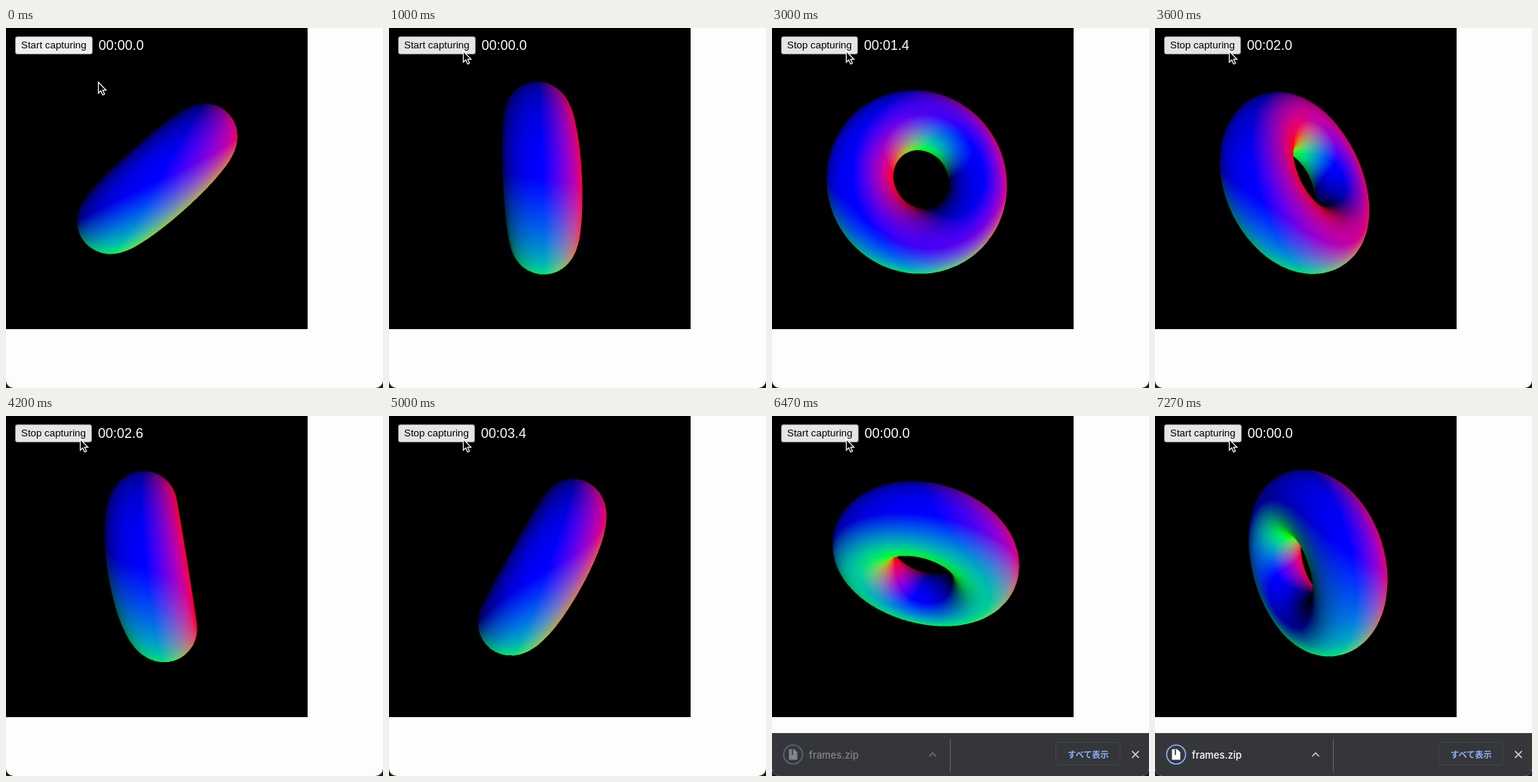
An HTML page with a canvas for the animation above (7.34 s loop, 500 px wide and 477 px high).

```html
<!DOCTYPE html>
<html lang="ja">
<head>
<meta charset="utf-8">
<title>Torus capture</title>
<style>
  html, body { margin: 0; width: 100%; height: 100%; overflow: hidden; background: #1c1c1c; }
  #window {
    position: absolute; left: 0; top: 0; width: 500px; height: 477px; overflow: hidden;
    border-radius: 0 0 10px 10px; background: #fdfdfd;
    font-family: "Liberation Sans", Arial, sans-serif;
  }
  #sketch { position: absolute; left: 0; top: 0; width: 400px; height: 399px; background: #000; }
  #torus { position: absolute; left: 68px; top: 67px; width: 264px; height: 264px; }
  #panel { position: absolute; left: 12px; top: 11px; height: 24px; display: flex; align-items: center; gap: 8px; white-space: nowrap; }
  #button {
    box-sizing: border-box; height: 24px; padding: 0 7px; line-height: 22px;
    border: 1px solid #8a8a8a; border-radius: 3px;
    background: #efefef; color: #000; font-size: 13.333px;
  }
  #button.hover { background: #e5e5e5; }
  #button.active { background: #f5f5f5; }
  #timer { color: #fff; font-size: 18px; line-height: 24px; }
  #overlay { position: absolute; left: 0; top: 0; }
  #bar { position: absolute; left: 0; top: 420px; width: 500px; height: 57px; background: #35363a; color: #fff; box-shadow: inset 0 1px #505155; }
  #bar svg { position: absolute; left: 0; top: 0; }
  #name { position: absolute; left: 49px; top: 20px; font: 500 13px/18px Inter, sans-serif; }
  #all { position: absolute; left: 392px; top: 19px; font: 700 11.2px/18px "Noto Sans CJK JP", "Noto Sans CJK", sans-serif; color: #8ab4f8; white-space: nowrap; }
</style>
</head>
<body>
<div id="window">
  <div id="sketch"></div>
  <canvas id="torus" width="528" height="528"></canvas>
  <div id="panel"><div id="button">Start capturing</div><div id="timer">00:00.0</div></div>
  <div id="bar">
    <svg width="500" height="57" fill="none">
      <g id="item">
        <circle id="halo" cx="28" cy="28.5" r="15" stroke="#8ab4f8" stroke-width="2"/>
        <circle cx="28" cy="28.5" r="12.5" fill="#35363a" stroke="#8ab4f8" stroke-width="1.6"/>
        <path d="M22.5 21.5H29.5L33.5 25.5V35.5H22.5Z" fill="#fff"/>
        <path d="M27 22V29" stroke="#35363a" stroke-width="1.6"/>
        <path d="M208.5 31L213 26.5L217.5 31" stroke="#c4c6ca" stroke-width="1.7"/>
      </g>
      <path d="M236.5 8V51" stroke="#66686d"/>
      <rect x="376.5" y="12.5" width="85" height="30" rx="3" stroke="#424449"/>
      <path d="M477.5 24L486.5 33M486.5 24L477.5 33" stroke="#d0d2d6" stroke-width="1.7"/>
    </svg>
    <div id="name">frames.zip</div>
    <div id="all">すべて表示</div>
  </div>
  <svg id="overlay" width="500" height="477" fill="none">
    <g id="ring">
      <circle cx="98.5" cy="31" r="19" stroke="#000" stroke-width="4.5"/>
      <circle cx="98.5" cy="31" r="21.2" stroke="#fff" stroke-width="1.4"/>
      <circle cx="98.5" cy="31" r="17.3" stroke="#fff" stroke-width="1.6"/>
    </g>
    <path id="pointer" d="M.5.8V15.3L3.8 12.2L6.2 17.8L8.7 16.7L6.3 11.3H10.7Z" fill="#000" stroke="#fff" stroke-width="1.2"/>
  </svg>
</div>
<script>
const LOOP = 7340, STEP = 1000 / 15, LAST = 109;
const CAPTURE = { origin: 1515, start: 1660, stop: 5850 };
const PRESSES = [[1390, 1590], [5590, 5810]];
const $ = id => document.getElementById(id);
const progress = (t, from, to) => Math.min(1, Math.max(0, (t - from) / (to - from)));
const ease = p => p * p * (3 - 2 * p);

// Torus mesh: ring radius 80, tube radius 40, seen from EYE
const RING = 80, TUBE = 40, AROUND = 72, ACROSS = 36;
const EYE = 200 / Math.tan(Math.PI / 6);
const canvas = $('torus'), ctx = canvas.getContext('2d');
const N = canvas.width, SCALE = 2;
const image = ctx.createImageData(N, N);
const pixels = new Uint32Array(image.data.buffer);
const depth = new Float32Array(N * N);
const mesh = [], faces = [];
for (let i = 0; i <= ACROSS; i++) {
  const phi = 2 * Math.PI * i / ACROSS;
  for (let j = 0; j <= AROUND; j++) {
    const theta = 2 * Math.PI * j / AROUND;
    const normal = [Math.cos(phi) * Math.cos(theta), Math.cos(phi) * Math.sin(theta), Math.sin(phi)];
    const point = [normal[0] * TUBE + RING * Math.cos(theta), normal[1] * TUBE + RING * Math.sin(theta), normal[2] * TUBE];
    mesh.push({ point, normal });
    if (i < ACROSS && j < AROUND) {
      const a = i * (AROUND + 1) + j, d = a + AROUND + 1;
      faces.push([a, a + 1, d], [d, a + 1, d + 1]);
    }
  }
}

function rotator(a, b) {
  const ca = Math.cos(a), sa = Math.sin(a), cb = Math.cos(b), sb = Math.sin(b);
  return ([x, y, z]) => {
    const turned = z * cb - x * sb;
    return [x * cb + z * sb, y * ca - turned * sa, y * sa + turned * ca];
  };
}

function fillTriangle(p, q, r) {
  const area = (q.x - p.x) * (r.y - p.y) - (q.y - p.y) * (r.x - p.x);
  if (!area) return;
  const x0 = Math.max(0, Math.ceil(Math.min(p.x, q.x, r.x) - .5));
  const x1 = Math.min(N - 1, Math.floor(Math.max(p.x, q.x, r.x) - .5));
  const y0 = Math.max(0, Math.ceil(Math.min(p.y, q.y, r.y) - .5));
  const y1 = Math.min(N - 1, Math.floor(Math.max(p.y, q.y, r.y) - .5));
  for (let py = y0; py <= y1; py++) {
    for (let px = x0; px <= x1; px++) {
      const x = px + .5, y = py + .5;
      const u = ((q.x - x) * (r.y - y) - (q.y - y) * (r.x - x)) / area;
      const v = ((r.x - x) * (p.y - y) - (r.y - y) * (p.x - x)) / area;
      const k = 1 - u - v;
      if (u < 0 || v < 0 || k < 0) continue;
      const w = u * p.w + v * q.w + k * r.w, at = py * N + px;
      if (w <= depth[at]) continue;
      depth[at] = w;
      for (let c = 0; c < 3; c++) {
        image.data[at * 4 + c] = 255 * (u * p.n[c] + v * q.n[c] + k * r.n[c]) / w;
      }
      image.data[at * 4 + 3] = 255;
    }
  }
}

function drawTorus(seconds) {
  const rotate = rotator(.6 * seconds, .9 * seconds);
  const corners = mesh.map(({ point, normal }) => {
    const [x, y, z] = rotate(point), w = 1 / (EYE - z), zoom = EYE * SCALE * w;
    return { x: N / 2 + x * zoom, y: N / 2 + y * zoom, w, n: rotate(normal).map(c => c * w) };
  });
  depth.fill(0);
  pixels.fill(0);
  for (const [a, b, c] of faces) fillTriangle(corners[a], corners[b], corners[c]);
  ctx.putImageData(image, 0, 0);
}

const sketchTime = t => (t < 5800 ? t - 2680 : Math.max(3120, t - 2735)) / 1000;

function drawControls(t) {
  const capturing = t >= CAPTURE.start && t < CAPTURE.stop;
  const pressed = PRESSES.some(([from, to]) => t >= from && t < to);
  const move = ease(progress(t, 200, 780));
  const tenths = capturing ? Math.floor((t - CAPTURE.origin) / 100) : 0;
  $('button').textContent = (capturing ? 'Stop' : 'Start') + ' capturing';
  $('button').className = pressed ? 'active' : move > .88 ? 'hover' : '';
  $('timer').textContent = `00:0${Math.floor(tenths / 10)}.${tenths % 10}`;
  $('pointer').setAttribute('transform', `translate(${122 - 24 * move} ${71 - 41 * move})`);
  $('ring').style.display = pressed ? '' : 'none';
}

function drawBar(t) {
  const shown = ease(progress(t, 6130, 6390));
  const item = progress(t, 6380, 6600);
  $('bar').style.transform = `translateY(${57 * (1 - shown)}px)`;
  $('item').style.opacity = $('name').style.opacity = item;
  $('halo').style.opacity = .4 * Math.sin(Math.PI * progress(t, 6600, 7270));
}

const begin = performance.now();
let shownStep = -1;
function tick() {
  const elapsed = Math.max(0, performance.now() - begin) % LOOP;
  const step = Math.min(LAST, Math.floor((elapsed + 5) / STEP));
  if (step !== shownStep) {
    shownStep = step;
    const t = step * STEP;
    drawTorus(sketchTime(t));
    drawControls(t);
    drawBar(t);
  }
  requestAnimationFrame(tick);
}
tick();
</script>
</body>
</html>
```
